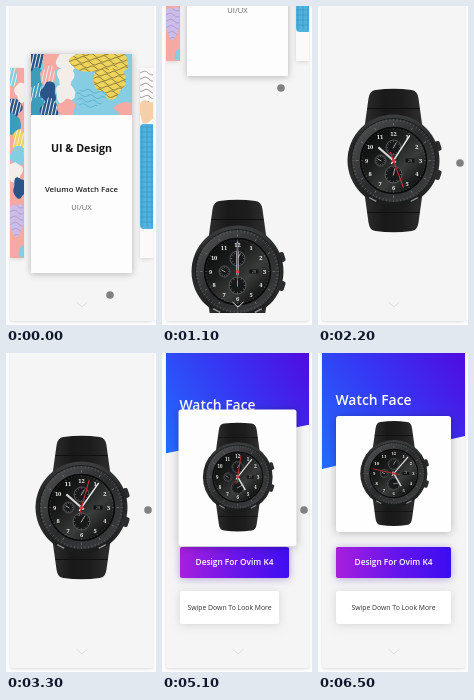
An HTML page with a canvas for the animation above (6.6 s loop, 150 by 319 pixels).

```html
<!DOCTYPE html>
<html lang="en">
<head>
<meta charset="utf-8">
<title>Watch face showcase</title>
<style>
  html, body { margin: 0; width: 100%; height: 100%; overflow: hidden; background: #fdfdfd; }
  canvas { display: block; width: 150px; height: 319px; }
</style>
</head>
<body>
<canvas id="stage"></canvas>
<script>
const W = 150, H = 319, LOOP = 6600, STEP = 100;
const SANS = '"Open Sans", "Noto Sans", sans-serif';
const SERIF = '"Noto Serif", "Liberation Serif", serif';
const PANEL = { x: 4, y: 0, w: 143, h: 315 };
const CARD = { x: 18, y: 63, w: 115, h: 116 };
const TRAVEL = 308;
const CORAL = '#f6a9a1', CREAM = '#f5eee8', NAVY = '#2b5488', TEAL = '#3c9cba';
const SKY = '#86cde4', YELLOW = '#eed35c', LILAC = '#cbbce9';

const canvas = document.getElementById('stage');
const c = canvas.getContext('2d');
const ratio = window.devicePixelRatio || 1;
canvas.width = W * ratio;
canvas.height = H * ratio;

const clamp = v => Math.max(0, Math.min(1, v));
const lerp = (a, b, p) => a + (b - a) * p;
const smooth = (t, start, span) => (1 - Math.cos(Math.PI * clamp((t - start) / span))) / 2;
const rad = deg => deg * Math.PI / 180;

function seeded(seed) {
  return () => {
    seed = (seed * 16807) % 2147483647;
    return seed / 2147483647;
  };
}

function group(draw) {
  c.save();
  draw();
  c.restore();
}

function turned(angle, draw) {
  group(() => {
    c.rotate(rad(angle));
    draw();
  });
}

function rect(x, y, w, h, fill, r = 0) {
  c.beginPath();
  c.roundRect(x, y, w, h, r);
  c.fillStyle = fill;
  c.fill();
}

function raised(x, y, w, h, fill, r, blur, shade) {
  group(() => {
    c.shadowColor = shade;
    c.shadowBlur = blur * ratio;
    c.shadowOffsetY = ratio;
    rect(x, y, w, h, fill, r);
  });
}

function disc(r, fill, edge, width = 1, x = 0, y = 0) {
  c.beginPath();
  c.arc(x, y, r, 0, 7);
  if (fill) { c.fillStyle = fill; c.fill(); }
  if (edge) { c.strokeStyle = edge; c.lineWidth = width; c.stroke(); }
}

function line(color, width, ...p) {
  c.beginPath();
  for (let i = 0; i < p.length; i += 2) c.lineTo(p[i], p[i + 1]);
  c.strokeStyle = color;
  c.lineWidth = width;
  c.stroke();
}

function ramp(x0, y0, x1, y1, ...colors) {
  const g = c.createLinearGradient(x0, y0, x1, y1);
  colors.forEach((color, i) => g.addColorStop(i / (colors.length - 1), color));
  return g;
}

function text(str, x, y, size, weight, color, align = 'center', font = SANS) {
  c.font = `${weight} ${size}px ${font}`;
  c.textAlign = align;
  c.textBaseline = 'alphabetic';
  c.fillStyle = color;
  c.fillText(str, x, y);
}

function clipBox(x, y, w, h) {
  c.beginPath();
  c.rect(x, y, w, h);
  c.clip();
}

// Wobbly oval, filled and optionally hatched or covered in squiggles
function blob(x, y, rx, ry, fill, cover) {
  group(() => {
    c.translate(x, y);
    c.beginPath();
    for (let a = 0; a < 6.28; a += 0.1) {
      const k = 1 + 0.12 * Math.sin(a * 3 + x) + 0.07 * Math.sin(a * 5 + y);
      c.lineTo(Math.cos(a) * rx * k, Math.sin(a) * ry * k);
    }
    c.closePath();
    c.fillStyle = fill;
    c.fill();
    c.clip();
    if (cover) cover(rx * 1.2, ry * 1.2);
  });
}

function squiggles(color, gap = 4) {
  return (rx, ry) => {
    for (let y = -ry; y < ry; y += gap) {
      c.beginPath();
      for (let x = -rx; x <= rx; x++) c.lineTo(x, y + x * 0.15 + 1.4 * Math.sin(x * 0.5 + y));
      c.strokeStyle = color;
      c.lineWidth = 0.7;
      c.stroke();
    }
  };
}

function hatch(color) {
  return (rx, ry) => {
    for (let x = -rx; x < rx; x += 3.5) line(color, 1, x + 3, -ry, x - 3, ry);
  };
}

function coverArt() {
  clipBox(25, 48, 101, 61);
  rect(25, 48, 101, 61, SKY);
  const rnd = seeded(41);
  const tints = [NAVY, CORAL, CREAM, TEAL];
  for (let i = 0; i < 12; i++) {
    const x = 28 + (i % 3) * 14, y = 52 + Math.floor(i / 3) * 17;
    blob(x + rnd() * 5, y + rnd() * 5, 7 + rnd() * 3, 11, tints[(i + (i >> 2)) % 4],
      i % 2 ? null : hatch('#e5eff0'));
  }
  blob(94, 54, 29, 13, YELLOW, squiggles('#5d5229'));
  blob(104, 76, 16, 15, YELLOW, squiggles('#5d5229'));
  blob(84, 92, 15, 10, SKY, squiggles('#4ea9c7', 5));
  blob(122, 104, 13, 8, CORAL);
}

function leftArt() {
  clipBox(4, 62, 14, 190);
  rect(4, 62, 14, 190, CORAL);
  const rnd = seeded(7);
  const tints = [SKY, CREAM, NAVY, TEAL, YELLOW];
  for (let i = 0; i < 8; i++) {
    blob(5 + rnd() * 12, 70 + i * 16, 7, 10, tints[i % 5], i % 2 ? null : hatch(CREAM));
  }
  blob(10, 213, 8, 16, LILAC, squiggles('#9f90c2', 6));
  blob(18, 246, 5, 7, SKY);
}

function rightArt() {
  clipBox(134, 62, 13, 190);
  rect(134, 62, 13, 190, '#fbfaf8');
  blob(141, 80, 12, 16, '#fbfaf8', squiggles('#66686b', 6));
  blob(141, 105, 9, 11, '#f4cfa9');
  rect(134, 118, 15, 105, '#4fb3e0', 4);
  for (let y = 121; y < 221; y += 5) line('#398fbd', 0.6, 134, y, 147, y);
  for (let x = 136; x < 147; x += 5) line('#398fbd', 0.6, x, 119, x, 221);
}

function coverPage(scroll) {
  c.translate(0, -scroll);
  for (const x of [4, 134]) raised(x, 62, 13, 190, '#fff', 0, 4, '#0002');
  group(leftArt);
  group(rightArt);
  raised(25, 48, 101, 219, '#fdfdfd', 1, 7, '#0004');
  group(coverArt);
  text('UI & Design', 75.5, 146, 10.7, 700, '#161616');
  text('Velumo Watch Face', 75.5, 185.5, 7.8, 600, '#222');
  text('UI/UX', 75.5, 204, 7.6, 400, '#666');
}

function hand(angle, length, tail, color, width) {
  turned(angle, () => line(color, width, 0, tail, 0, -length));
}

function ticks(count, outer, inner, width, color) {
  for (let i = 0; i < count; i++) {
    turned(i * 360 / count, () => line(color(i), width, 0, -outer, 0, -inner));
  }
}

function subdial(x, y, r, angle) {
  group(() => {
    c.translate(x, y);
    disc(r, '#17191a', '#6a6a6a', 0.7);
    ticks(12, r - 0.5, r - 2, 0.5, () => '#8f8f8f');
    hand(angle, r - 2, 1, '#b9b9b9', 0.8);
  });
}

// One strap half, tapering away from the case; side is -1 above, 1 below
function strapHalf(side) {
  group(() => {
    c.scale(1, side);
    c.beginPath();
    c.moveTo(-30, 26);
    c.lineTo(-25, 62);
    c.quadraticCurveTo(-24, 70, -18, 70.5);
    c.quadraticCurveTo(0, 73, 18, 70.5);
    c.quadraticCurveTo(24, 70, 25, 62);
    c.lineTo(30, 26);
    c.fillStyle = ramp(-28, 0, 28, 0, '#2c2c2d', '#191919', '#1d1d1d', '#2e2e2f');
    c.fill();
    line('#101010', 1, -26, 52, 26, 52);
  });
}

function watchCase() {
  strapHalf(-1);
  strapHalf(1);
  for (const a of [72, 108]) turned(a, () => rect(-5, -49.5, 10, 6, '#2b2c2d', 2));
  disc(46, ramp(0, -46, 0, 46, '#3d3e3f', '#232424', '#2b2c2c', '#191a1a'));
  for (const a of [-152, 152]) turned(a, () => rect(-4, -45, 8, 1.5, '#8d8e8f'));
  disc(42, ramp(-30, -30, 30, 30, '#474849', '#2a2b2c', '#393a3b'), '#1a1b1b', 1);
  ticks(72, 41.5, 39, 0.8, () => '#565758');
  ticks(12, 37.5, 35, 0.7, () => '#7b7c7d');
  disc(33, ramp(-24, -24, 24, 24, '#0c0d0d', '#1c1d1d', '#3a3b3b', '#101111'), '#0a0a0a', 1.5);
  ticks(60, 32, 30.8, 0.4, i => i % 5 ? '#666' : '#ccc');
}

function watch(x, y, size, t) {
  c.translate(x, y);
  c.scale(size, size);
  watchCase();
  const seconds = Math.max(0, t - 1384) * 0.196;
  subdial(0, -13, 7.5, 30);
  subdial(-13, 0, 5.5, 300);
  subdial(0, 14, 8.5, seconds / 12);
  rect(12, -2, 9, 4, '#101010');
  text('28', 16.5, 1.3, 3.6, 400, '#aaa');
  for (let n = 1; n <= 12; n++) {
    const a = rad(n * 30);
    text(n, Math.sin(a) * 27, 2.1 - Math.cos(a) * 27, 5.8, 700, '#f4f4f4', 'center', SERIF);
  }
  const wake = smooth(t, 1384, 750);
  const hour = -49 * wake + 199 * smooth(t, 3650, 700);
  const minute = 33 * wake + Math.max(0, t - 2200) * 0.0018;
  hand(hour, 20, 3, '#d6d6d6', 2);
  hand(minute, 30, 4, '#f2f2f2', 1.4);
  hand(seconds, 29, 9, '#d62e39', 1);
  disc(1.8, '#d23a40');
}

function growBox(y, h, p, fill, shade, label, size, weight, color) {
  const w = CARD.w * p;
  if (w < 4) return;
  raised(CARD.x, y, w, h, fill, 2, 8, shade);
  group(() => {
    clipBox(CARD.x, y, w, h);
    text(label, CARD.x + w / 2, y + h / 2 + size * 0.36, size, weight, color);
  });
}

function detailPage(t, p) {
  const head = smooth(t, 4475, 823);
  const left = 116 * head, right = 83 * head;
  c.beginPath();
  c.moveTo(4, 0);
  c.lineTo(147, 0);
  c.lineTo(147, right);
  c.lineTo(4, left);
  c.fillStyle = ramp(4, left, 147, 10, '#236cff', '#343bf4', '#4e0fe0');
  c.fill();
  text('Watch Face', 17.5, 52 + 45 * (1 - p), 13.9, 600, '#fff', 'left');

  const paint = ramp(18, 0, 133, 0, '#a81fdd', '#6915ec', '#3a0df2');
  growBox(194, 31, smooth(t, 4397, 823), paint, '#4a20a066', 'Design For Ovim K4', 8.3, 600, '#fff');
  growBox(238, 33, smooth(t, 4477, 823), '#fff', '#0002', 'Swipe Down To Look More', 6.85, 400, '#333');

  const tone = Math.round(lerp(245, 254, p));
  const box = ['x', 'y', 'w', 'h'].map(k => lerp(PANEL[k], CARD[k], p));
  raised(...box, `rgb(${tone},${tone},${tone})`, 3 * p, 9 * p, '#0004');
}

// Swipe up, drift to the right edge, then leave upwards
function pointer(t) {
  const back = smooth(t, 1300, 800);
  const x = 104 + 15 * smooth(t, 300, 800) + 23 * back;
  const y = 289 - 207 * smooth(t, 100, 810) + 75 * back - 28 * smooth(t, 6000, 500);
  disc(3.8, '#808080', null, 0, x, y);
}

function draw(t) {
  c.setTransform(ratio, 0, 0, ratio, 0, 0);
  rect(0, 0, W, H, '#fdfdfd');
  raised(PANEL.x, PANEL.y - 4, PANEL.w, PANEL.h + 4, '#f5f5f5', 2, 3, '#0002');

  const scroll = TRAVEL * smooth(t, 130, 1644);
  const p = smooth(t, 4450, 823);
  group(() => {
    clipBox(PANEL.x, 0, PANEL.w, 307);
    if (scroll < 290) group(() => coverPage(scroll));
    if (p > 0) group(() => detailPage(t, p));
    const y = lerp(154.5 + TRAVEL - scroll, 120.5, p);
    group(() => watch(lerp(75.5, 75.8, p), y, lerp(1, 0.73, p), t));
  });

  line('#dfdfdf', 1, 70.5, 296, 76, 301, 81.5, 296);
  if (t < 6500) pointer(t);
}

const start = performance.now();
function tick() {
  const t = (performance.now() - start) % LOOP;
  draw(Math.floor(t / STEP) * STEP);
  requestAnimationFrame(tick);
}
tick();
</script>
</body>
</html>
```
